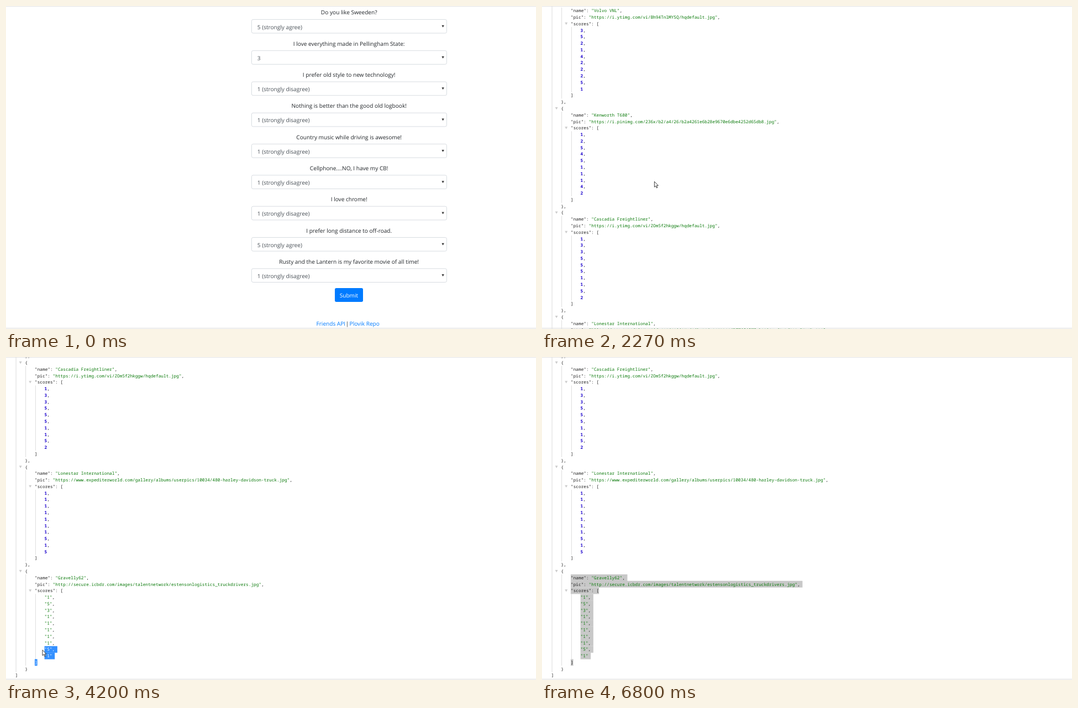
Recreate the animation shown at these times as an HTML page with a canvas. Size 959 by 584 pixels, loop 7.07 s.

```html
<!DOCTYPE html>
<html lang="en">
<head>
<meta charset="utf-8">
<title>Survey and friends API</title>
<style>
html, body { margin: 0; width: 100%; height: 100%; overflow: hidden; background: #fff; }
canvas { display: block; }
</style>
</head>
<body>
<canvas id="stage" width="959" height="584"></canvas>
<script>
const ctx = document.getElementById('stage').getContext('2d');
const W = 959, H = 584, LOOP = 7070, FPS = 15;
const SANS = '"Open Sans", "Noto Sans", sans-serif';
const MONO = '7.78px "Noto Sans Mono", "DejaVu Sans Mono", monospace';
const ROW = 11.78, FIRST_ROW = 10.7, INDENT = 17.6, LEFT = 16.8;

// Moments, in ticks of 1/15 s
const HOVER = 9, STATUS_ON = 12, PAGE_TWO = 17, LEAVE = 20;
const SELECT = 61, RELEASE = 84, CURSOR_OFF = 87, BLUR = 102;

const QUESTIONS = [
  ['Do you like Sweeden?', 5],
  ['I love everything made in Pellingham State:', 3],
  ['I prefer old style to new technology!', 1],
  ['Nothing is better than the good old logbook!', 1],
  ['Country music while driving is awesome!', 1],
  ['Cellphone....NO, I have my CB!', 1],
  ['I love chrome!', 1],
  ['I prefer long distance to off-road.', 5],
  ['Rusty and the Lantern is my favorite movie of all time!', 1]
];
const ANSWERS = { 1: '1 (strongly disagree)', 3: '3', 5: '5 (strongly agree)' };

const FRIENDS = [
  ['Mack Anthem', 'https://i.ytimg.com/vi/1dII7tY8-bc/hqdefault.jpg', '5115115525'],
  ['Volvo VNL', 'https://i.ytimg.com/vi/Bh94TnlMY5Q/hqdefault.jpg', '3521422251'],
  ['Kenworth T680', 'https://i.pinimg.com/236x/b2/a4/26/b2a4261e6b28e9670e6dbe4252d65db8.jpg', '1254511142'],
  ['Cascadia Freightliner', 'https://i.ytimg.com/vi/ZOm5f2hkggw/hqdefault.jpg', '1335551152'],
  ['Lonestar International', 'https://www.expediterworld.com/gallery/albums/userpics/10034/480-harley-davidson-truck.jpg', '1111111515'],
  ['Gravelly62', 'http://secure.icbdr.com/images/talentnetwork/estensonlogistics_truckdrivers.jpg', '1531111151']
];

// JSON rows as { depth, text }
const rows = [];
const addRow = (depth, text) => rows.push({ depth, text });
addRow(0, '[');
FRIENDS.forEach(([name, pic, scores], i) => {
  const last = i === FRIENDS.length - 1;
  addRow(1, '{');
  addRow(2, `"name": "${name}",`);
  addRow(2, `"pic": "${pic}",`);
  addRow(2, '"scores": [');
  [...scores].forEach((s, j) => addRow(3, (last ? `"${s}"` : s) + (j < 9 ? ',' : '')));
  addRow(2, ']');
  addRow(1, last ? '}' : '},');
});
addRow(0, ']');
const ANCHOR = rows.length - 3;

const smooth = p => p * p * (3 - 2 * p);
const easeIn = p => p ** 1.15;
const easeOut = p => 1 - (1 - p) ** 1.6;

// Each key: [tick, values..., easing into this key]
const SCROLL = [[29, 0], [34, 214.3, easeIn], [39, 455.7], [43, 577.7, easeOut]];
const CURSOR = [
  [5, 965, 584], [9, 576, 578, smooth], [11, 576, 578], [14, 575, 576], [19, 575, 576],
  [26, 203, 317, smooth], [49, 203, 317], [59, 72, 557, smooth], [60, 72, 557],
  [71, 37, 405.5, smooth], [72, 37, 405.5], [77, 37, 402], [84, 37, 402], [86, 36, 493]
];

function track(keys, tick, size) {
  const values = key => key.slice(1, 1 + size);
  const next = keys.findIndex(key => key[0] >= tick);
  if (next < 0) return values(keys[keys.length - 1]);
  if (next === 0) return values(keys[0]);
  const a = keys[next - 1], b = keys[next];
  const ease = b[1 + size] || (p => p);
  const p = ease((tick - a[0]) / (b[0] - a[0]));
  return values(a).map((v, i) => v + (b[i + 1] - v) * p);
}

function text(str, x, y, color, font, align = 'left') {
  ctx.font = font;
  ctx.textAlign = align;
  ctx.fillStyle = color;
  ctx.fillText(str, x, y);
}

function rect(x, y, w, h, color) {
  ctx.fillStyle = color;
  ctx.fillRect(x, y, w, h);
}

function box(x, y, w, h, radius, fill, stroke) {
  ctx.beginPath();
  ctx.roundRect(x, y, w, h, radius);
  ctx.fillStyle = fill;
  ctx.fill();
  if (!stroke) return;
  ctx.strokeStyle = stroke;
  ctx.lineWidth = 0.8;
  ctx.stroke();
}

function triangle(cx, cy, w, h, color) {
  ctx.beginPath();
  ctx.moveTo(cx - w / 2, cy - h / 2);
  ctx.lineTo(cx + w / 2, cy - h / 2);
  ctx.lineTo(cx, cy + h / 2);
  ctx.fillStyle = color;
  ctx.fill();
}

function drawForm(hover) {
  const font = '10.1px ' + SANS, center = 620.7;
  QUESTIONS.forEach(([label, score], i) => {
    const top = 24.4 + i * 56.3;
    text(label, center, top - 9, '#212529', font, 'center');
    box(444.4, top, 353, 24.7, 2.7, '#fff', '#ced4da');
    text(ANSWERS[score], 454.8, top + 17.1, '#495057', font);
    triangle(790.6, top + 12.3, 4.4, 4, '#333');
  });
  box(595, 510, 51, 25, 2.7, '#007bff');
  text('Submit', center - 0.3, 526.8, '#fff', font, 'center');

  const linkColor = hover ? '#0056b3' : '#007bff';
  text('Friends API', 561.5, 578.2, linkColor, font);
  if (hover) rect(561.5, 579.4, ctx.measureText('Friends API').width, 0.8, linkColor);
  text('|', 617.4, 578.2, '#212529', font, 'center');
  text('Plovik Repo', 621.6, 578.2, '#007bff', font);
}

const rowY = (i, scroll) => FIRST_ROW + i * ROW - scroll;
const rowX = row => LEFT + row.depth * INDENT;

function drawTokens(row, y, advance, override) {
  let x = rowX(row);
  for (const token of row.text.match(/"[^"]*":?|\d+|[^"\d]+/g)) {
    const number = /^\d/.test(token), string = /"$/.test(token);
    const color = number ? '#1a01cc' : string ? '#0b7a0b' : '#222';
    text(token, x, y + 2.8, override || color, (number ? 'bold ' : '') + MONO);
    x += token.length * advance;
  }
}

function guide(depth, from, to, scroll) {
  const top = rowY(from, scroll) - ROW / 2;
  rect(17.7 + depth * INDENT, top, 0.8, (to - from + 1) * ROW, '#d4d4d4');
}

function drawJson(tick, scroll) {
  ctx.font = MONO;
  const advance = ctx.measureText('0').width;

  guide(0, 1, rows.length - 2, scroll);
  FRIENDS.forEach((_, i) => {
    const start = 1 + i * 16;
    guide(1, start + 1, start + 14, scroll);
    guide(2, start + 4, start + 13, scroll);
  });

  const [dragX, dragY] = track(CURSOR, Math.min(tick, RELEASE), 2);
  const focus = tick < SELECT ? rows.length
    : Math.floor((dragY + scroll - FIRST_ROW) / ROW + 0.5);

  rows.forEach((row, i) => {
    const y = rowY(i, scroll), x = rowX(row), length = row.text.length;
    if (y < -ROW || y > H + ROW) return;
    if (/[[{]$/.test(row.text)) triangle(x - 8.2, y, 5, 4.4, '#ccc');
    drawTokens(row, y, advance);
    if (i < focus || i > ANCHOR) return;

    const column = Math.round((dragX - x) / advance);
    const from = i === focus ? Math.max(0, Math.min(length, column)) : 0;
    const lineBreak = i === ANCHOR || row.text.endsWith('[') ? 0 : 1;
    const blurred = tick >= BLUR;
    ctx.save();
    ctx.beginPath();
    ctx.rect(x + from * advance, y - ROW / 2, (length + lineBreak - from) * advance, ROW + 0.2);
    ctx.clip();
    rect(0, y - ROW, W, ROW * 2, blurred ? '#c8c8c8' : '#3390ff');
    drawTokens(row, y, advance, blurred ? null : '#fff');
    ctx.restore();
  });
}

function drawStatus() {
  box(-1, 569.3, 96.5, 13.2, [0, 2, 0, 0], '#fff', '#c4c4c4');
  text('localhost:3000/api/friends', 1.3, 578.3, '#5f6368', '7.5px ' + SANS);
}

const ARROW = new Path2D('M.4 .4V10.4L2.7 8.3L4.3 12L5.9 11.3L4.3 7.7H7.4Z');
const HAND = new Path2D('M.3 .8Q1-.2 1.8 .8V4L5.8 4.6Q7.4 5 7.2 6.6L6.4 11H2L-1.6 6.4Q-1.2 5.2 .3 6.6Z');

function drawCursor(tick) {
  if (tick < 6 || tick >= CURSOR_OFF) return;
  const [x, y] = track(CURSOR, tick, 2);
  const shape = tick >= HOVER && tick < LEAVE ? HAND : ARROW;
  ctx.save();
  ctx.translate(x, y);
  ctx.fillStyle = '#fff';
  ctx.strokeStyle = '#111';
  ctx.lineWidth = 0.8;
  ctx.fill(shape);
  ctx.stroke(shape);
  ctx.restore();
}

function draw() {
  const time = performance.now() % LOOP;
  const tick = Math.floor(time * FPS / 1000 + 0.1);
  ctx.textRendering = 'geometricPrecision';
  rect(0, 0, W, H, '#fff');
  if (tick < PAGE_TWO) drawForm(tick >= HOVER);
  else drawJson(tick, track(SCROLL, tick, 1)[0]);
  rect(0, 0, W, 1, '#e2e2e2');
  rect(0, 582, W, 1, '#dcdcdc');
  if (tick >= STATUS_ON && tick < LEAVE + 2) drawStatus();
  drawCursor(tick);
  requestAnimationFrame(draw);
}
draw();
</script>
</body>
</html>
```
